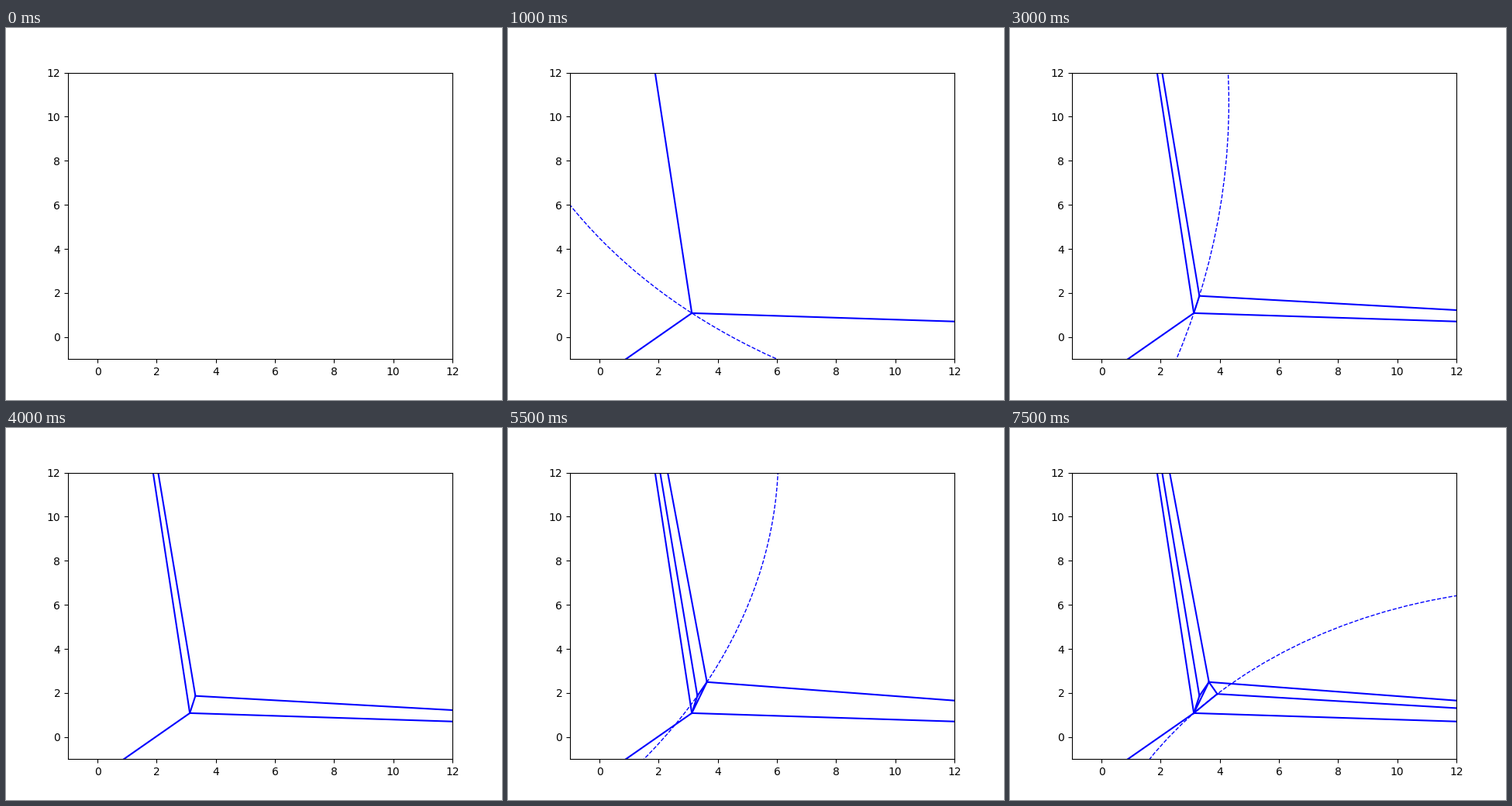
Animation of 640x480 px, one loop 8 s. Source, as a matplotlib script:

```python
import numpy as np
import matplotlib.pyplot as plt
from matplotlib.animation import FuncAnimation
from matplotlib.patches import Circle

# Incremental Delaunay triangulation inside a large outer triangle.
S = 28.5
PTS = {
    "1": (S, 0), "2": (0, S), "3": (-S, -S),
    "A": (3.12, 1.086), "B": (3.308, 1.867),
    "C": (3.631, 2.496), "D": (3.913, 1.956),
}
STEPS = 16
INTERVAL = 500

# edge: (first step, step at which it is gone)
EDGES = {
    "A1": (1, STEPS), "A2": (1, STEPS), "A3": (1, STEPS),
    "BA": (5, STEPS), "B1": (5, 10), "B2": (5, STEPS),
    "CB": (9, STEPS), "C1": (9, STEPS), "C2": (9, STEPS),
    "CA": (10, STEPS),
    "DA": (14, STEPS), "DC": (14, STEPS), "D1": (14, STEPS),
}

# triangle whose circumcircle is tested at each step
TESTS = {
    1: "A31", 2: "A12", 3: "A23",
    5: "BA1", 6: "BA2", 7: "B12",
    9: "CB1", 10: "CB1", 11: "CB2", 12: "C12",
    14: "DC1", 15: "DA1",
}


def circumcircle(tri):
    a, b, c = (np.array(PTS[k], float) for k in tri)
    m = 2 * np.array([b - a, c - a])
    rhs = [b @ b - a @ a, c @ c - a @ a]
    center = np.linalg.solve(m, rhs)
    return center, np.hypot(*(a - center))


fig, ax = plt.subplots(figsize=(6.4, 4.8), dpi=100)
ax.set_xlim(-1, 12)
ax.set_ylim(-1, 12)

lines = {}
for edge in EDGES:
    xs, ys = zip(*(PTS[k] for k in edge))
    lines[edge], = ax.plot(xs, ys, "b-", lw=1.5, scalex=False, scaley=False)

circle = Circle((0, 0), 1, fill=False, ec="b", ls="--", lw=1)
ax.add_patch(circle)


def update(step):
    for edge, (start, end) in EDGES.items():
        lines[edge].set_visible(start <= step < end)
    tri = TESTS.get(step)
    circle.set_visible(tri is not None)
    if tri:
        center, radius = circumcircle(tri)
        circle.set_center(center)
        circle.set_radius(radius)
    return [*lines.values(), circle]


anim = FuncAnimation(fig, update, frames=STEPS, interval=INTERVAL,
                     repeat=True, repeat_delay=0, blit=False)
plt.show()
```
